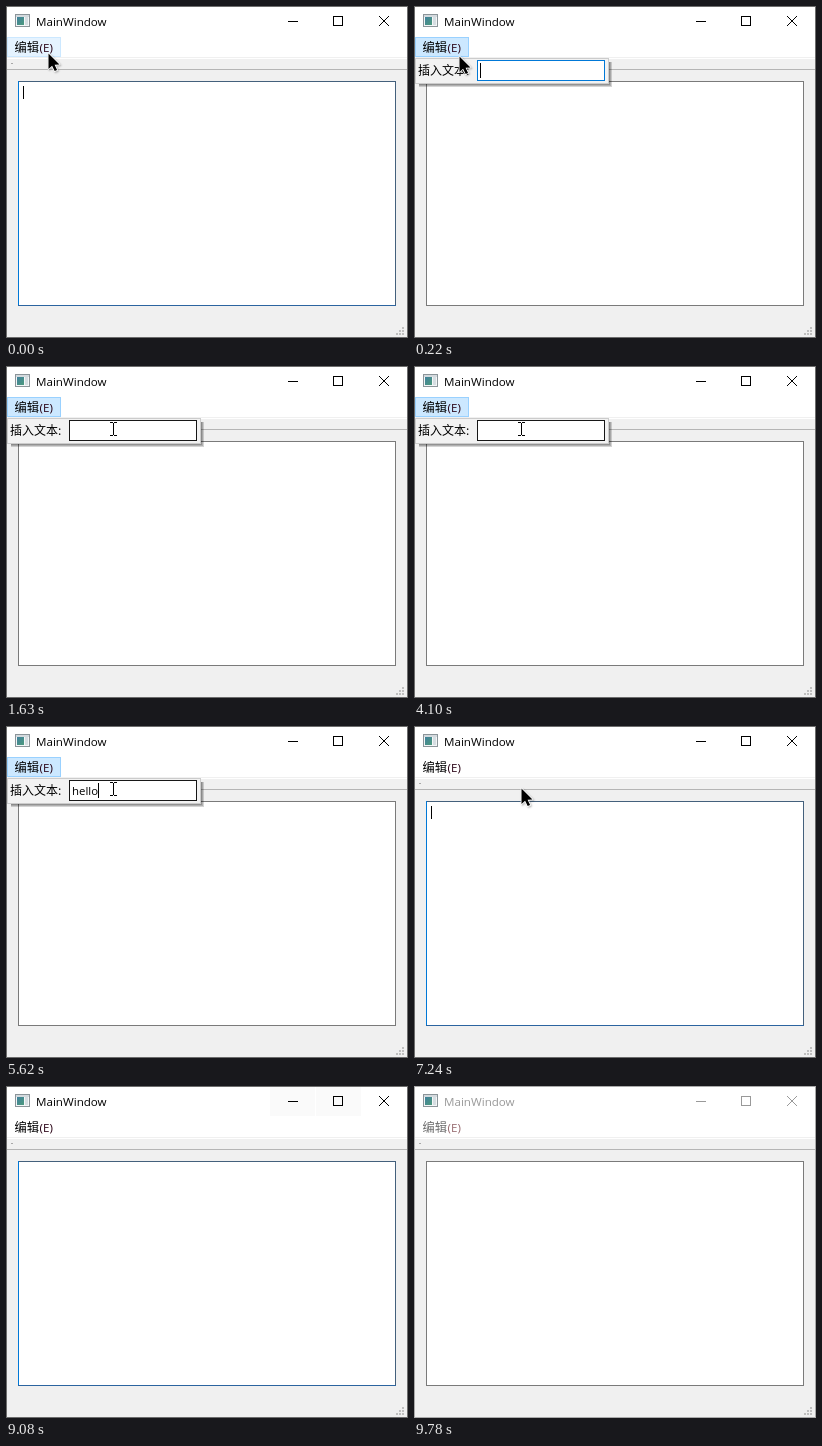
Write an HTML page with a canvas that moves like this. It is 402x332 px and loops after 9.93 s.

```html
<!DOCTYPE html>
<html lang="zh">
<head>
<meta charset="utf-8">
<title>MainWindow</title>
<style>
  html, body { margin: 0; width: 100%; height: 100%; overflow: hidden; background: #f0f0f0; }
  canvas { display: block; width: 402px; height: 332px; }
</style>
</head>
<body>
<canvas id="stage"></canvas>
<script>
const W = 402, H = 332, LOOP = 9930;
const LATIN = '"Open Sans", "Noto Sans", sans-serif';
const CJK = '"Noto Sans CJK SC", "Noto Sans CJK", "Noto Sans CJK JP", sans-serif';
const BLUE = '#0078d7';

const canvas = document.getElementById('stage');
const ratio = window.devicePixelRatio || 1;
canvas.width = W * ratio;
canvas.height = H * ratio;
const c = canvas.getContext('2d');
c.scale(ratio, ratio);

// Timeline, in ms
const typing = [
  [0, ''], [2520, 'h'], [2640, 'he'], [2840, 'hel'], [2960, 'hell'], [3080, 'hello'],
  [3510, ''], [4430, 'h'], [4530, 'he'], [5240, 'hel'], [5310, 'hell'], [5620, 'hello'],
  [6370, 'hello1'], [6500, 'hello12'], [6620, 'hello123']
];
const fieldCaret = [[180, 590], [1110, 1630], [2140, 4100], [4430, 5140], [5240, 6190], [6370, 7150]];
const editCaret = [[0, 100], [7240, 7770], [8300, 8830], [9310, 9740]];
const clicks = [[100, 180], [7520, 7600]];
const pointerPath = [
  [0, 42, 47], [100, 42, 47], [220, 45, 50], [390, 50, 49], [540, 50, 49],
  [660, 61, 64], [780, 90, 65], [900, 107, 62], [8300, 107, 62], [8480, 145, 62],
  [8640, 210, 52], [8800, 276, 22], [8860, 315, 15], [8910, 335, 9], [8950, 348, -24]
];
const returnPath = [[9100, 398, 150], [9190, 366, 245], [9280, 340, 318], [9310, 332, 340]];

const clamp = v => Math.max(0, Math.min(1, v));
const within = (spans, t) => spans.some(([a, b]) => t >= a && t < b);
const latest = (table, t) => table.reduce((v, [at, s]) => at <= t ? s : v, '');
const mix = (a, b, k) => `rgb(${a.map((v, i) => Math.round(v + (b[i] - v) * k))})`;
const gray = (a, b, k) => mix([a, a, a], [b, b, b], k);

function along(path, t) {
  if (t < path[0][0] || t >= path[path.length - 1][0]) return null;
  const i = path.findIndex(p => p[0] > t);
  const [t0, x0, y0] = path[i - 1], [t1, x1, y1] = path[i];
  const k = (t - t0) / (t1 - t0);
  return [Math.round(x0 + (x1 - x0) * k), Math.round(y0 + (y1 - y0) * k)];
}

function rect(x, y, w, h, fill) {
  c.fillStyle = fill;
  c.fillRect(x, y, w, h);
}

function frame(x, y, w, h, color, fill) {
  if (fill) rect(x, y, w, h, fill);
  c.strokeStyle = color;
  c.lineWidth = 1;
  c.strokeRect(x + .5, y + .5, w - 1, h - 1);
}

function text(s, x, y, size, family, color) {
  c.font = `${size}px ${family}`;
  c.fillStyle = color;
  c.fillText(s, x, y);
}

function polygon(points) {
  c.beginPath();
  points.forEach(([x, y]) => c.lineTo(x, y));
  c.closePath();
}

function drawTitle(t, faded) {
  rect(1, 1, 400, 30, '#fff');

  // Caption button hover, fading after the pointer passes
  [[264, 8780], [310, 8840]].forEach(([x, start]) => {
    const a = clamp(Math.min((t - start) / 60, (9130 - t) / 250));
    if (a) rect(x, 1, 45, 29, `rgba(229,229,229,${a})`);
  });

  // Window icon
  const g = c.createLinearGradient(10, 11, 18, 19);
  g.addColorStop(0, '#3f7f9f');
  g.addColorStop(1, '#4d9a7d');
  frame(9, 8, 15, 13, '#8b9499', '#f4f6f7');
  rect(10, 9, 13, 2, '#d3d9dd');
  rect(11, 11, 7, 8, g);
  rect(19, 11, 3, 8, '#d5dde1');

  text('MainWindow', 30, 20, 11.6, LATIN, gray(0, 153, faded));

  const ink = gray(0, 153, faded);
  rect(282, 15, 10, 1, ink);
  frame(327, 10, 10, 10, ink);
  c.beginPath();
  c.moveTo(373, 10); c.lineTo(383, 20);
  c.moveTo(383, 10); c.lineTo(373, 20);
  c.stroke();
}

function drawMenuBar(t, faded) {
  rect(1, 31, 400, 20, '#fff');
  if (t < 100) frame(1, 31, 54, 20, '#cce8ff', '#e5f3ff');
  else if (t < 7240) frame(1, 31, 54, 20, '#99d1ff', '#cce8ff');
  const ink = gray(0, 109, faded);
  text('编辑', 8.5, 46, 12.3, CJK, ink);
  text('(E)', 33.5, 46, 11.6, LATIN, mix([40, 0, 20], [150, 105, 110], faded));

  rect(1, 51, 400, 1, '#f0f0f0');
  rect(1, 52, 400, 1, '#fff');
  rect(1, 63, 400, 1, '#b4b4b4');
  rect(5, 57, 2, 1, '#a8a8a8');
}

function drawEditor(t) {
  const focused = t < 100 || (t >= 7240 && t < 9740);
  frame(12, 75, 378, 225, focused ? '#44607c' : '#7a7a7a', '#fff');
  if (focused) {
    rect(12, 75, 1, 225, BLUE);
    rect(12, 299, 378, 1, '#2b64a0');
  }
  if (within(editCaret, t)) rect(17, 80, 1, 13, '#000');
}

function drawGrip() {
  for (let row = 0; row < 3; row++)
    for (let i = 0; i <= row; i++)
      rect(396 - i * 3, 321 + row * 3, 2, 2, '#bfbfbf');
}

function drawPopup(t) {
  if (t < 100 || t >= 7210) return;
  c.save();
  c.globalAlpha = clamp((t - 90) / 110);

  // Soft drop shadow, a few stacked layers
  for (let i = 0; i < 4; i++) rect(5, 56, 190 + i, 22 + i, 'rgba(0,0,0,.17)');
  frame(1, 52, 194, 26, '#ccc', '#f2f2f2');
  text('插入文本:', 4, 69, 12, CJK, '#000');

  const hover = clamp((t - 670) / 200);
  frame(63, 54, 128, 21, mix([0, 120, 215], [23, 23, 23], hover), '#fff');

  const typed = latest(typing, t);
  text(typed, 66, 69, 11.4, LATIN, '#000');
  if (within(fieldCaret, t)) rect(66 + Math.floor(c.measureText(typed).width), 57, 1, 15, '#000');
  c.restore();
}

function drawArrow(x, y) {
  const shape = [[0, 0], [0, 15.5], [3.6, 12.2], [6.2, 17.6], [8.6, 16.5], [6.1, 11.2], [11, 11]];
  c.save();
  c.translate(x + .5, y + .5);
  c.lineJoin = 'round';
  c.shadowColor = 'rgba(0,0,0,.3)';
  c.shadowBlur = 2;
  c.shadowOffsetX = c.shadowOffsetY = 1;
  polygon(shape);
  c.strokeStyle = '#fff';
  c.lineWidth = 1.6;
  c.stroke();
  c.shadowColor = 'transparent';
  c.fillStyle = '#000';
  c.fill();
  c.restore();
}

function drawBeam(x) {
  rect(x, 57, 1, 12, '#000');
  [56, 69].forEach(y => {
    rect(x - 3, y, 3, 1, '#000');
    rect(x + 1, y, 3, 1, '#000');
  });
}

function drawPointer(t) {
  const p = t < 9000 ? along(pointerPath, t) : along(returnPath, t);
  if (!p) return;
  const [x, y] = p;
  if (within(clicks, t)) {
    [[12, '#000'], [11, '#fff']].forEach(([r, color]) => {
      c.beginPath();
      c.arc(x + .5, y + 1, r, 0, Math.PI * 2);
      c.strokeStyle = color;
      c.lineWidth = 1;
      c.stroke();
    });
  }
  if (t > 660 && t < 7210 && x > 63) drawBeam(x);
  else drawArrow(x, y);
}

function draw(t) {
  const faded = t < 9740 ? 0 : t < 9780 ? .5 : 1;
  rect(0, 0, W, H, '#f0f0f0');
  drawTitle(t, faded);
  drawMenuBar(t, faded);
  drawEditor(t);
  drawGrip();
  drawPopup(t);
  frame(0, 0, W, H, gray(109, 170, faded));
  drawPointer(t);
}

const start = performance.now();
function tick() {
  draw((performance.now() - start) % LOOP);
  requestAnimationFrame(tick);
}
tick();
</script>
</body>
</html>
```
